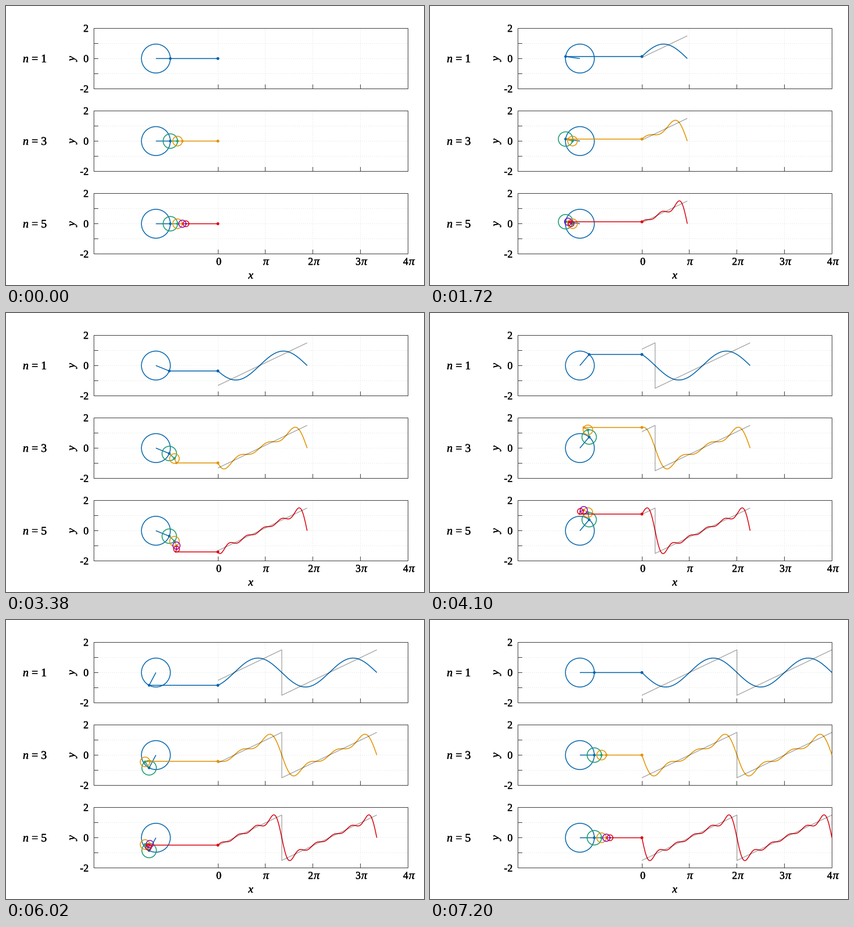
A matplotlib script for the animation above (7.22 s loop, 720 by 480 pixels).

```python
import numpy as np
import matplotlib.pyplot as plt
from matplotlib.animation import FuncAnimation
from matplotlib.patches import Circle, Rectangle
from matplotlib.patheffects import withStroke

W, H, DPI = 720, 480, 80
PT = 72 / DPI                      # points per pixel
FRAMES, STEP = 361, np.radians(2)

LEFT, RIGHT, X0 = 151.4, 692.4, 365.0
UNIT = (RIGHT - X0) / (4 * np.pi)  # pixels per axis unit
HUB = X0 - 4.1 * UNIT
PANELS = [(1, 90.4), (3, 232.4), (5, 374.6)]
AMP = 1.5

COLORS = ["#0062ac", "#0e9768", "#e39200", "#8a00cc", "#de0010"]
DOTS = [2.3, 2.2, 2.1, 1.6, 1.3]
INK = "#404040"
GRID = "#dde2de"

plt.rcParams["font.family"] = "Liberation Serif"
fig = plt.figure(figsize=(W / DPI, H / DPI), dpi=DPI, facecolor="#fefffe")
ax = fig.add_axes([0, 0, 1, 1])
ax.set(xlim=(0, W), ylim=(H, 0))
ax.axis("off")


def label(x, y, text, size=18, ha="left", **kw):
    kw.setdefault("va", "baseline")
    ax.text(x, y, text, fontsize=size * PT, ha=ha, color="black",
            path_effects=[withStroke(linewidth=0.35, foreground="black")], **kw)


def rule(xs, ys, color=INK, **kw):
    # snapping moves one-pixel lines half a pixel on
    ax.plot(np.array(xs) - 0.5, np.array(ys) - 0.5, color=color, lw=PT, **kw)


def stroke(color, width, z, **kw):
    line, = ax.plot([], [], color=color, lw=width * PT, zorder=z,
                    solid_capstyle="butt", **kw)
    line.set_snap(False)
    return line


def dot(color, r, z):
    return ax.add_patch(Circle((0, 0), r, fc=color, lw=0, zorder=z))


def draw_axes(n, cy):
    top, bottom = cy - 2 * UNIT, cy + 2 * UNIT
    dotted = dict(color=GRID, ls=(0, (1, 2.5)), zorder=0)
    for v in (-1, 0, 1):
        y = cy - v * UNIT
        rule([LEFT, RIGHT], [y, y], **dotted)
        rule([LEFT, LEFT + 7], [y, y])
    for k in range(4):
        x = X0 + k * np.pi * UNIT
        rule([x, x], [top, bottom], **dotted)
        rule([x, x], [bottom - 7, bottom])
    ax.add_patch(Rectangle((LEFT - 0.5, top - 0.5), RIGHT - LEFT, bottom - top,
                           fill=False, ec=INK, lw=PT, zorder=2))
    for v in (-2, 0, 2):
        label(142.2, cy - v * UNIT + 6, str(v), ha="right")
    label(29, cy + 6.5, "n", 20, style="italic")
    label(44, cy + 6.5, f"= {n}", 20)
    label(113.8, cy, "y", 19, ha="center", va="center",
          rotation=90, style="italic")


class Panel:
    def __init__(self, n, cy):
        self.n, self.cy = n, cy
        draw_axes(n, cy)
        color = COLORS[n - 1]
        self.rings, self.arms, self.tips = [], [], []
        for k in range(n):
            c, z = COLORS[k], 5 + k
            ring = Circle((HUB, cy), AMP * 2 / np.pi / (k + 1) * UNIT,
                          fill=False, ec=c, lw=1.45 * PT, zorder=z)
            self.rings.append(ax.add_patch(ring))
            self.arms.append(stroke(c, 1.45, z))
            self.tips.append(dot(c, DOTS[k], z + 0.5))
        self.link = stroke(color, 1.5, 11)
        self.curve = stroke(color, 1.5, 12)
        self.saw = stroke("black", 1.3, 13, alpha=0.36)
        self.end = dot(color, 2.5, 14)

    def update(self, theta):
        x, y = HUB, self.cy
        for k, (ring, arm, tip) in enumerate(zip(self.rings, self.arms, self.tips), 1):
            r = ring.radius
            nx, ny = x + r * np.cos(k * theta), y - r * np.sin(k * theta)
            ring.center = (x, y)
            arm.set_data([x, nx], [y, ny])
            tip.center = (nx, ny)
            x, y = nx, ny
        self.link.set_data([x, X0], [y, y])
        self.end.center = (X0, y)
        self.draw_wave(theta)

    def plot(self, line, t, v):
        line.set_data(X0 + np.array(t) * UNIT, self.cy - np.array(v) * UNIT)

    def draw_wave(self, theta):
        if theta == 0:
            self.plot(self.curve, [], [])
            self.plot(self.saw, [], [])
            return
        t = np.linspace(0, theta, 3 + int(theta * 24))
        wave = sum(np.sin(k * (theta - t)) / k for k in range(1, self.n + 1))
        self.plot(self.curve, t, AMP * 2 / np.pi * wave)

        jump = theta - 2 * np.pi
        if jump > 1e-6:
            start = AMP * (1 - jump / np.pi)
            self.plot(self.saw, [0, jump, jump, theta], [start, AMP, -AMP, AMP])
        else:
            start = AMP * (1 - theta / np.pi)
            self.plot(self.saw, [0, theta], [start, AMP])


panels = [Panel(n, cy) for n, cy in PANELS]

label(366.5, 445.3, "0", ha="center")
for m in range(1, 5):
    x = X0 + m * np.pi * UNIT + 1
    if m == 1:
        label(x, 445.3, "π", 20, ha="center", style="italic")
    else:
        label(x - 0.5, 445.3, str(m), ha="right")
        label(x + 0.5, 445.3, "π", 20, style="italic")
label(421.6, 469, "x", 19.5, ha="center", style="italic")


def update(i):
    for p in panels:
        p.update(i * STEP)
    return []


anim = FuncAnimation(fig, update, frames=FRAMES, interval=20,
                     repeat=True, repeat_delay=0, blit=False)
plt.show()
```
